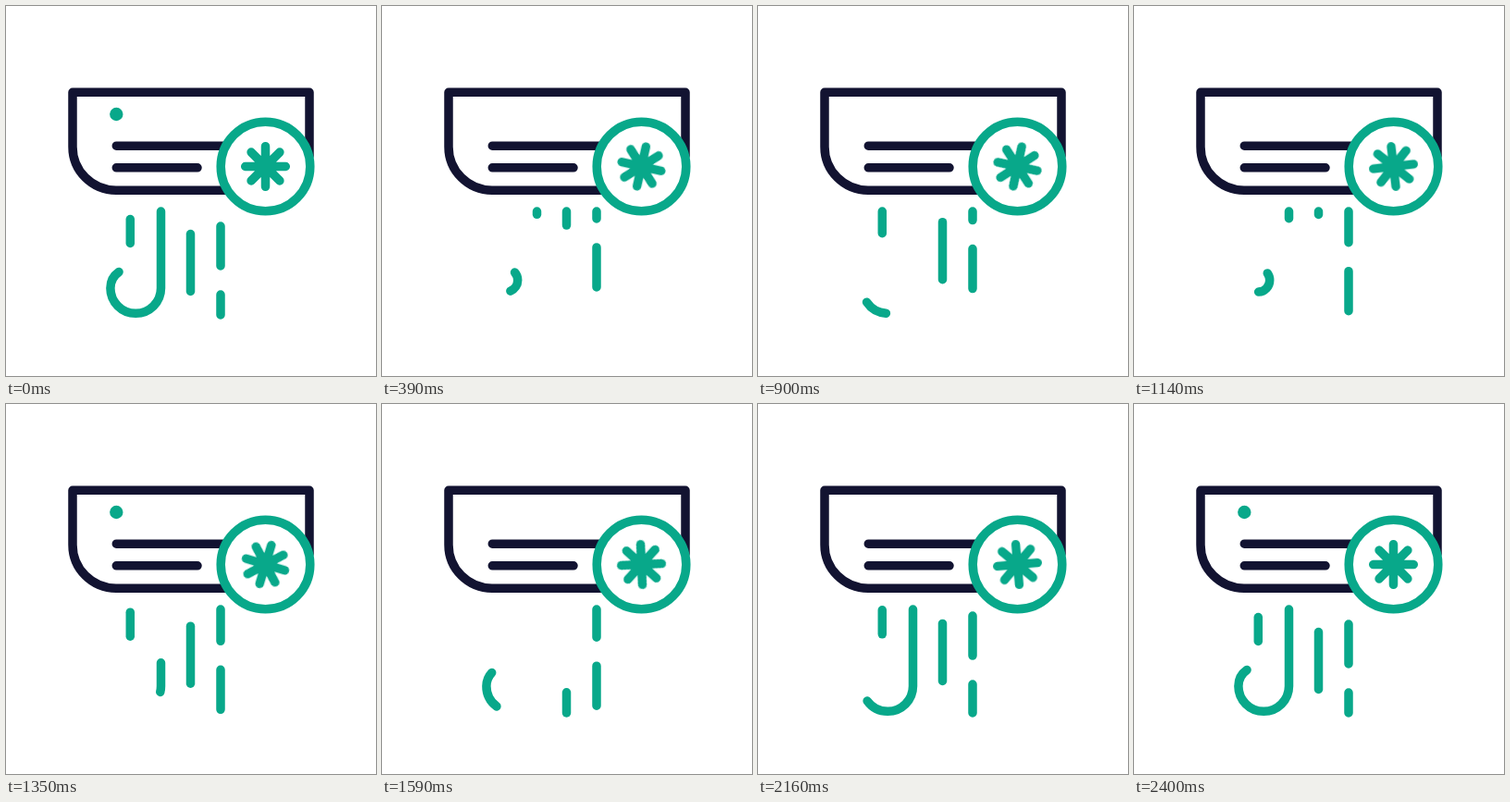
Animation, 400 px wide and 400 px high, one loop 3.43 s. Source, as an HTML page:

```html
<!DOCTYPE html>
<html lang="en">
<head>
<meta charset="utf-8">
<title>Air conditioner</title>
<style>
  @property --lead { syntax: "<length>"; inherits: true; initial-value: 189px; }
  @property --len { syntax: "<length>"; inherits: true; initial-value: 189px; }

  /* Everything moves for 2400 ms (69.971%) and then rests */
  :root { --loop: 3430ms infinite; }
  html, body { margin: 0; width: 100%; height: 100%; overflow: hidden; background: #fff; }
  svg { display: block; width: 100%; height: 100%; }
  path, circle { fill: none; stroke-width: 9.5; stroke-linecap: round; stroke-linejoin: round; }
  .body { stroke: #121331; }
  .air { stroke: #08a88a; }
  .badge { fill: #fff; stroke: #08a88a; }

  .lamp { fill: #08a88a; animation: blink var(--loop) step-end; }
  @keyframes blink {
    0%, 17.493%, 34.985%, 52.478%, 69.971%, 100% { opacity: 1; }
    8.746%, 26.239%, 43.732%, 61.224% { opacity: 0; }
  }

  .flake {
    transform-origin: 280.5px 173.5px;
    animation: spin var(--loop) cubic-bezier(.333, 0, .667, 1);
  }
  @keyframes spin {
    0% { transform: rotate(0deg); }
    69.971%, 100% { transform: rotate(180deg); }
  }

  /* Straight streams: each runs a whole number of dash periods */
  .stream {
    --period: calc(var(--dash) + var(--gap));
    stroke-dasharray: var(--dash) var(--gap);
    animation: run var(--loop) cubic-bezier(.2, 0, .5, 1);
  }
  @keyframes run {
    0% { stroke-dashoffset: calc(-1 * var(--at)); }
    69.971%, 100% { stroke-dashoffset: calc(-1 * var(--at) - var(--cycles) * var(--period)); }
  }

  /* Curling stream: gusts follow each other 233px apart */
  .curl {
    animation:
      travel var(--loop) cubic-bezier(.32, 0, .8, 1),
      stretch var(--loop);
  }
  .gust {
    stroke-dasharray: var(--len) 2000px;
    stroke-dashoffset: calc(var(--len) - var(--lead) + var(--k) * 233px);
  }
  @keyframes travel {
    0% { --lead: 189px; }
    69.971%, 100% { --lead: 888px; }
  }
  @keyframes stretch {
    0% { --len: 189px; animation-timing-function: ease-in-out; }
    11.37% { --len: 24px; animation-timing-function: cubic-bezier(.5, 0, .75, 0); }
    69.971%, 100% { --len: 160px; }
  }
</style>
</head>
<body>
<svg viewBox="0 0 400 400">
  <defs>
    <path id="hook" d="M167.5 222V305A27.3 27.3 0 0 1 112.9 305A21.3 21.3 0 0 1 134 283.7A12.7 12.7 0 0 1 134 309.1A12.7 12.7 0 0 1 125.6 305.9"/>
  </defs>
  <g class="body">
    <path d="M328 162V93.3H72V152.2A47 47 0 0 0 119 199.2H245"/>
    <path d="M119.3 151.2H245M119.3 174.8H207"/>
  </g>
  <circle class="lamp" cx="119.3" cy="117" r="7.2"/>
  <circle class="badge" cx="280.5" cy="173.5" r="48.3"/>
  <path class="air flake" d="M280.5 151.7v43.6M258.7 173.5h43.6M265.1 158.1l30.8 30.8M295.9 158.1l-30.8 30.8"/>
  <g class="air">
    <path class="stream" d="M134.3 222V275" style="--dash:26px; --gap:118px; --at:8.5px; --cycles:4"/>
    <path class="stream" d="M199.5 222V334" style="--dash:62px; --gap:109px; --at:24.5px; --cycles:4"/>
    <path class="stream" d="M232 222V334" style="--dash:43px; --gap:31px; --at:16px; --cycles:9"/>
  </g>
  <g class="air curl">
    <use class="gust" href="#hook" style="--k:0"/>
    <use class="gust" href="#hook" style="--k:1"/>
    <use class="gust" href="#hook" style="--k:2"/>
    <use class="gust" href="#hook" style="--k:3; --len:240px"/>
  </g>
</svg>
</body>
</html>
```
